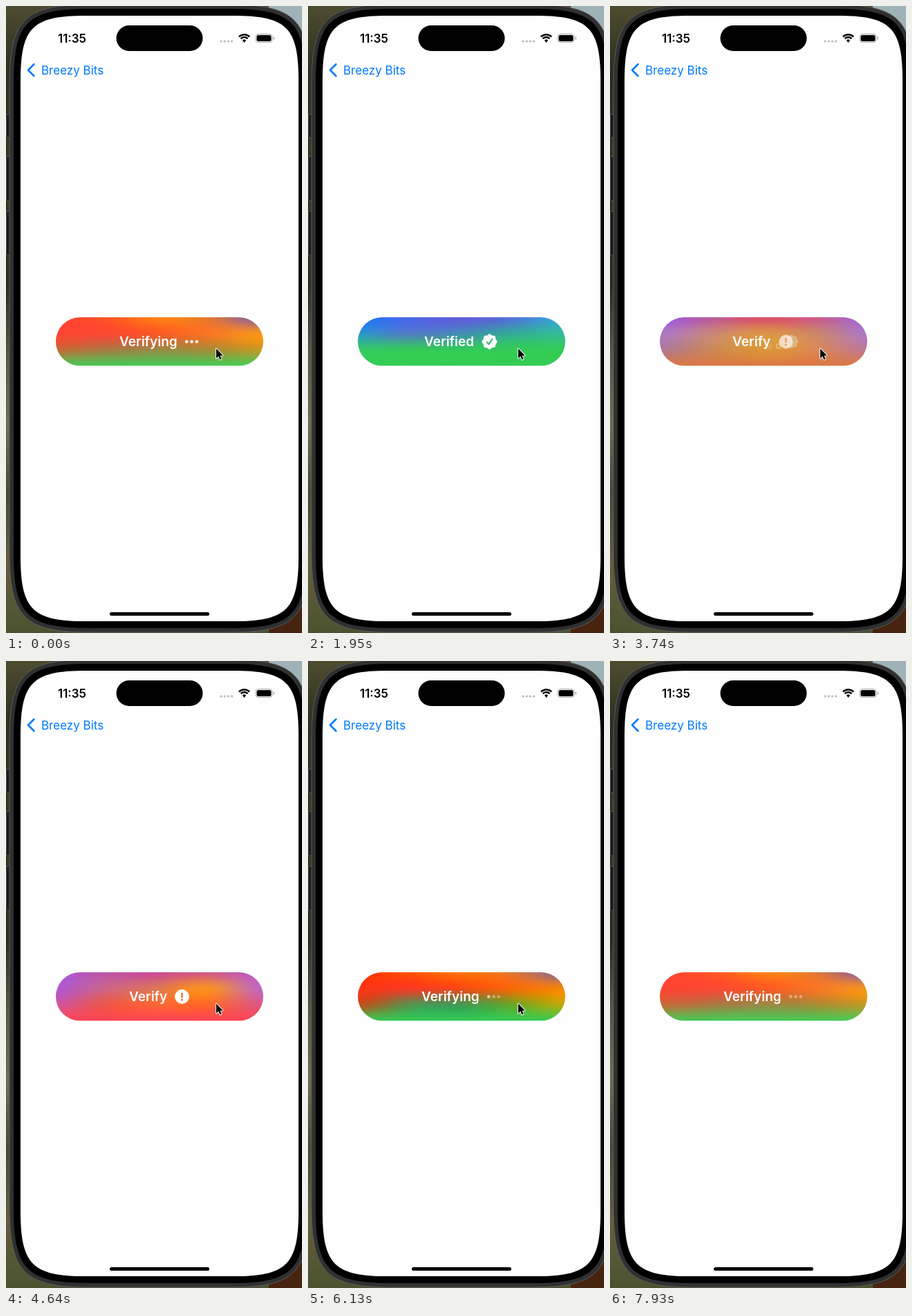
Recreate the animation shown at these times as an HTML page with a canvas. Size 428 by 905 pixels, loop 8000 ms.

```html
<!DOCTYPE html>
<html lang="en">
<head>
<meta charset="utf-8">
<title>Verify button</title>
<style>
html, body { margin: 0; width: 100%; height: 100%; overflow: hidden; }
canvas { display: block; }
</style>
</head>
<body>
<canvas id="stage" width="428" height="905"></canvas>
<script>
const LOOP = 8000, STEP = 150, SWAP = 450;
const ctx = document.getElementById('stage').getContext('2d');
const mesh = document.createElement('canvas');
mesh.width = 5;
mesh.height = 4;
const meshCtx = mesh.getContext('2d');

// Colour meshes: three rows of five, then one colour for the bottom row
const grid = text => {
  const list = text.trim().split(/\s+/).map(hex => [...hex].map(d => parseInt(d, 16) * 17));
  while (list.length < 20) list.push(list[15]);
  return list;
};
const busy = grid('f43 f52 f81 d73 65c  f43 f43 f52 f72 f91  c63 a74 984 a83 c92  4c5');
const vivid = grid('f30 f50 f70 d73 66b  f31 f32 f41 f60 f80  c41 495 395 6a2 ca0  3c5');
const turning = grid('c78 c77 a88 77a 57d  d76 d84 c85 b95 ba5  b84 b83 b93 ca3 ca3  4c5');
const done = grid('17f 46e 65d 56d 3ad  29c 57c 48b 3a9 3b9  3c6 3c5 3c5 3c5 3c5  3c5');
const fading = grid('95e b59 d46 c58 96d  a7c c87 d94 c86 a7c  a79 c85 d93 d85 b79  d74');
const idle = grid('a5d b5a c49 c58 b5c  a5d c68 d75 f91 b6c  c5a e54 f63 f62 d58  f45');
const meshKeys = [
  [0, busy], [700, vivid], [1300, busy], [1500, turning], [1800, done], [3400, done],
  [3750, fading], [4200, idle], [5600, idle], [6100, vivid], [6800, busy], [7300, vivid],
  [7800, busy]
];

const labels = [
  { start: -1e4, word: 'Verifying', x: 164, icon: drawDots, iconX: 268.5 },
  { start: 1350, word: 'Verified', x: 168, icon: drawSeal, iconX: 262.5 },
  { start: 3500, word: 'Verify', x: 178, icon: drawAlert, iconX: 254.5 },
  { start: 5700, word: 'Verifying', x: 164, icon: drawDots, iconX: 268.5 }
];

const clamp = v => Math.max(0, Math.min(1, v));
const mix = (a, b, k) => a + (b - a) * k;

function box(x, y, w, h, r, fill) {
  ctx.beginPath();
  ctx.roundRect(x, y, w, h, r);
  if (fill) {
    ctx.fillStyle = fill;
    ctx.fill();
  }
}

// Box whose corners blend gradually into the sides
function softBox(x, y, w, h, r, fill) {
  const far = r * 1.53, near = r * 0.27;
  const X = x + w, Y = y + h;
  ctx.beginPath();
  ctx.moveTo(x, y + far);
  ctx.bezierCurveTo(x, y + near, x + near, y, x + far, y);
  ctx.lineTo(X - far, y);
  ctx.bezierCurveTo(X - near, y, X, y + near, X, y + far);
  ctx.lineTo(X, Y - far);
  ctx.bezierCurveTo(X, Y - near, X - near, Y, X - far, Y);
  ctx.lineTo(x + far, Y);
  ctx.bezierCurveTo(x + near, Y, x, Y - near, x, Y - far);
  ctx.closePath();
  ctx.fillStyle = fill;
  ctx.fill();
}

function disc(x, y, r, fill) {
  ctx.beginPath();
  ctx.arc(x, y, r, 0, Math.PI * 2);
  ctx.fillStyle = fill;
  ctx.fill();
}

function line(points, width, color) {
  ctx.beginPath();
  points.forEach(p => ctx.lineTo(...p));
  ctx.lineWidth = width;
  ctx.strokeStyle = color;
  ctx.lineCap = ctx.lineJoin = 'round';
  ctx.stroke();
}

function text(str, x, y, font, color) {
  ctx.font = font + ' Inter, Roboto, sans-serif';
  ctx.fillStyle = color;
  ctx.fillText(str, x, y);
}

function fade(height, colors) {
  const g = ctx.createLinearGradient(0, 0, 0, height);
  colors.forEach((c, i) => g.addColorStop(i / (colors.length - 1), c));
  return g;
}

function drawPhone() {
  ctx.fillStyle = fade(905, ['#4e4c30', '#2b2d1e', '#34361f', '#34331f', '#2b2c20',
    '#5a5744', '#716c55', '#484936', '#645f3c', '#4c5230']);
  ctx.fillRect(0, 0, 428, 905);
  ctx.fillStyle = fade(905, ['#4a3428', '#2c2018', '#47240f']);
  ctx.fillRect(380, 0, 48, 905);
  ctx.fillStyle = '#9fb2b8';
  ctx.fillRect(380, 0, 48, 45);
  for (const [y, h] of [[156, 34], [217, 64], [296, 64]]) {
    box(0.5, y, 8, h, 2, '#191919');
    ctx.lineWidth = 1;
    ctx.strokeStyle = '#555';
    ctx.stroke();
  }
  softBox(5, -2, 434, 906, 77, '#303030');
  ctx.lineWidth = 1;
  ctx.strokeStyle = '#5c5c5c';
  ctx.stroke();
  softBox(11, 4, 422, 894, 71, '#000');
  softBox(21, 14, 402, 874, 62, '#fefefe');
  box(159.5, 28, 125, 37, 18.5, '#000');
  box(150, 875, 144, 5, 2.5, '#000');
}

function drawBars() {
  ctx.textAlign = 'center';
  text('11:35', 95.5, 53, '600 17px', '#000');
  ctx.textAlign = 'left';
  for (let i = 0; i < 4; i++) disc(311 + i * 5.2, 51, 1.7, '#c0c0c2');

  // Wi-Fi fan
  ctx.lineCap = 'butt';
  ctx.strokeStyle = '#000';
  ctx.lineWidth = 2.4;
  for (const r of [10.8, 7]) {
    ctx.beginPath();
    ctx.arc(344.5, 52, r, -Math.PI * 0.75, -Math.PI * 0.25);
    ctx.stroke();
  }
  ctx.beginPath();
  ctx.moveTo(344.5, 53);
  ctx.arc(344.5, 52, 3.6, -Math.PI * 0.75, -Math.PI * 0.25);
  ctx.fillStyle = '#000';
  ctx.fill();

  box(361, 40.5, 24, 12, 3.8);
  ctx.lineWidth = 1;
  ctx.strokeStyle = '#a6a6a8';
  ctx.stroke();
  box(362.5, 42, 21, 9, 2.5, '#000');
  box(386.5, 44.5, 1.5, 4, 1, '#a6a6a8');

  line([[40.5, 84], [32, 92.5], [40.5, 101]], 2.5, '#007aff');
  text('Breezy Bits', 51, 98.5, '400 17px', '#007aff');
}

function drawMesh(t) {
  const i = meshKeys.findLastIndex(key => key[0] <= t);
  const [t0, from] = meshKeys[i];
  const [t1, to] = meshKeys[i + 1] || [LOOP, from];
  const k = (t - t0) / (t1 - t0);
  const img = meshCtx.createImageData(5, 4);
  from.forEach((c, n) => {
    img.data.set([...c.map((v, ch) => mix(v, to[n][ch], k)), 255], n * 4);
  });
  meshCtx.putImageData(img, 0, 0);

  const w = 300 / 4, h = 70 / 3;
  ctx.save();
  box(72, 449.3, 300, 70, 35);
  ctx.clip();
  ctx.imageSmoothingQuality = 'high';
  ctx.drawImage(mesh, 72 - w / 2 + 6 * Math.sin(t / 400), 449 - h / 2, 5 * w, 4 * h);
  ctx.restore();
}

// The dots light up one by one, then dim together
function drawDots(t) {
  const base = ctx.globalAlpha;
  const phase = (t < 3500 ? t / 1100 + 0.85 : (t - 5700) / 1100 + 1) % 1;
  for (let i = 0; i < 3; i++) {
    const lit = clamp((phase - 0.36 - i * 0.14) / 0.1) * clamp((1 - phase) / 0.05);
    ctx.globalAlpha = base * mix(0.37, 1, lit);
    disc((i - 1) * 7.3, 0, 2.3, '#fff');
  }
}

function drawSeal() {
  ctx.beginPath();
  for (let a = 0; a < Math.PI * 2; a += 0.05) {
    const r = 10.4 + 0.8 * Math.cos(8 * a);
    ctx.lineTo(r * Math.cos(a), r * Math.sin(a));
  }
  ctx.fillStyle = '#fff';
  ctx.fill();
  line([[-3.8, 0.8], [-1.2, 3.8], [4, -4]], 2.1, '#3cb868');
}

function drawAlert() {
  disc(0, 0, 10.4, '#fff');
  line([[0, -4.7], [0, 0.8]], 2.3, '#ee6430');
  disc(0, 4.6, 1.5, '#ee6430');
}

// Runs paint around a moved origin with its own size and opacity
function layer(x, y, scale, alpha, paint) {
  if (alpha <= 0) return;
  ctx.save();
  ctx.translate(x, y);
  ctx.scale(scale, scale);
  ctx.globalAlpha = alpha;
  paint();
  ctx.restore();
}

function drawLabel(t) {
  const n = labels.findLastIndex(label => label.start <= t);
  const now = labels[n], old = labels[n - 1] || now;
  const p = clamp((t - now.start) / SWAP);
  const left = mix(old.x, now.x, 1 - (1 - p) ** 3);
  ctx.font = '600 19px Inter, Roboto, sans-serif';

  const letter = (word, i, k, drop) => {
    if (!word[i]) return;
    const width = ctx.measureText(word[i]).width;
    const x = left + ctx.measureText(word.slice(0, i + 1)).width - width / 2;
    layer(x, 484.5 + drop * (1 - k), mix(0.5, 1, k), k, () => {
      text(word[i], -width / 2, 6.7, '600 19px', '#fff');
    });
  };
  for (let i = 0; i < 9; i++) {
    if (old.word[i] === now.word[i]) {
      letter(now.word, i, 1, 0);
    } else {
      const k = clamp(p * 1.8 - (i - 5) * 0.2);
      letter(old.word, i, 1 - k, 9);
      letter(now.word, i, k, -9);
    }
  }

  if (p < 1) layer(old.iconX, 484.5, mix(1, 0.8, p), 1 - clamp(p * 1.25), () => old.icon(t));
  layer(now.iconX, 484.5, mix(0.9, 1, p), clamp(p * 1.2), () => now.icon(t));
}

// The pointer rests, then leaves past the lower right edge
function drawPointer(t) {
  const k = clamp((t - 6950) / 600) ** 2;
  layer(304 + 140 * k, 494.5 + 409 * k, 1, 1, () => {
    line([[0, 0], [0, 14], [3.2, 11.1], [5.4, 16.1], [7.6, 15.1],
      [5.5, 10.3], [9.7, 9.9], [0, 0]], 1.8, '#fff');
    ctx.fillStyle = '#000';
    ctx.fill();
  });
}

function draw(ms) {
  const t = Math.floor((ms % LOOP + 30) / STEP) * STEP;
  drawPhone();
  drawBars();
  drawMesh(t);
  drawLabel(t);
  drawPointer(t);
}

const begin = performance.now();
(function tick() {
  draw(performance.now() - begin);
  requestAnimationFrame(tick);
})();
</script>
</body>
</html>
```
